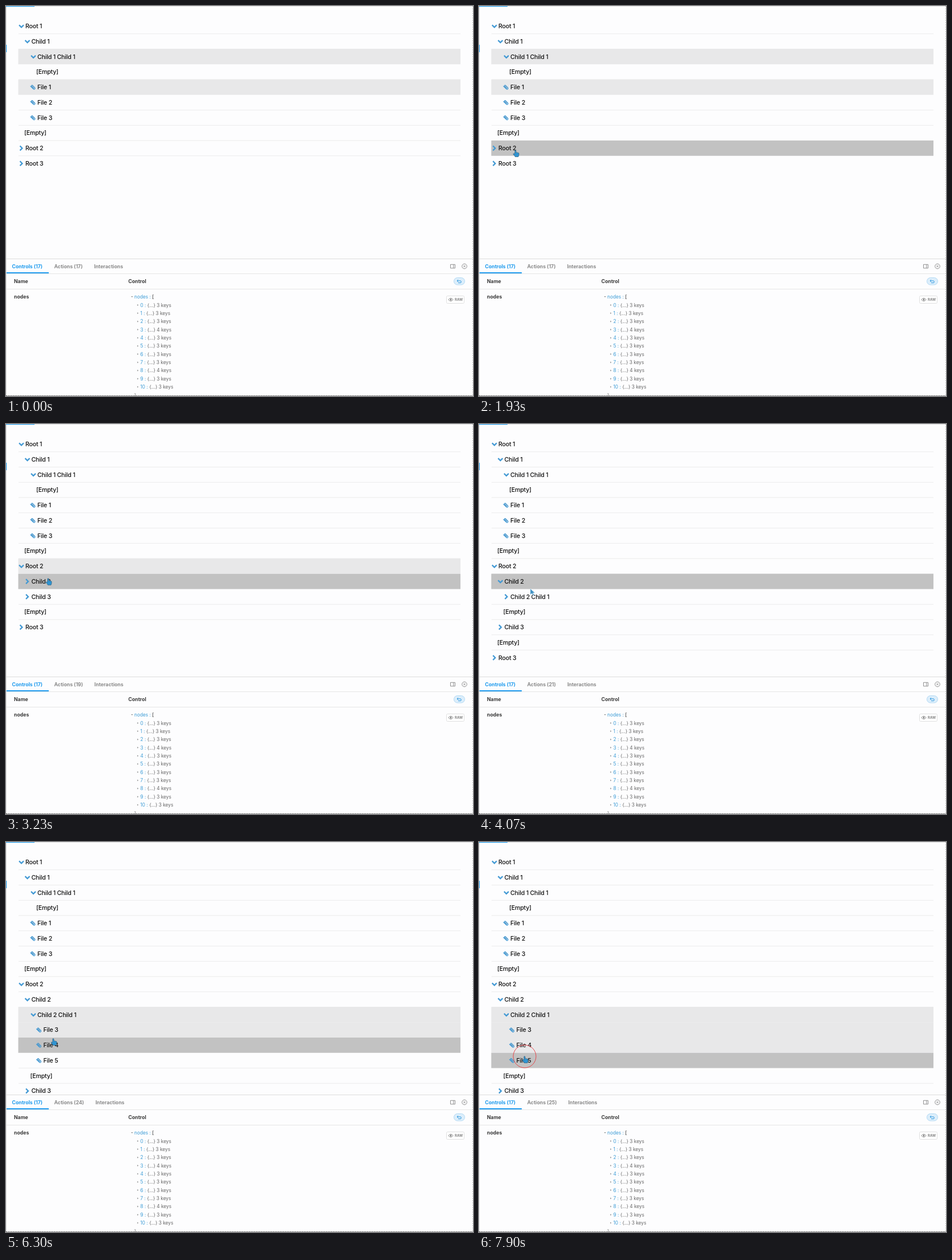
Recreate the animation shown at these times as an HTML page. Size 819 px wide and 684 px high, loop 8 s.

```html
<!DOCTYPE html>
<html lang="en">
<head>
<meta charset="utf-8">
<title>Tree view</title>
<style>
  html, body { margin: 0; width: 100%; height: 100%; overflow: hidden; background: #fdfdfe; }
  svg { display: block; width: 819px; height: 684px; font-family: Inter, Roboto, sans-serif; }
  #tree { font-size: 10.6px; letter-spacing: -.2px; fill: #111; stroke: none; font-weight: 450; }
  .ui { font-size: 8.7px; font-weight: 700; fill: #3a3a3a; }
  .muted { fill: #8b8b8b; }
  .blue { fill: #1e9bee; }
  .json { font-size: 8.3px; fill: #666; white-space: pre; }
  .json .key { fill: #3a9bd6; }
  .line { fill: none; stroke: #e6e6e6; }
  .icon { fill: none; stroke: #858585; stroke-width: .9; }
</style>
</head>
<body>
<svg viewBox="0 0 819 684">
  <defs>
    <path id="open" d="M-4 -2 L0 2 L4 -2" fill="none" stroke="#4299d4" stroke-width="2.2"/>
    <path id="closed" d="M-2 -4 L2 0 L-2 4" fill="none" stroke="#4299d4" stroke-width="2.2"/>
    <g id="file" fill="none" stroke-linecap="round" transform="rotate(45)">
      <path d="M-4 1.6 H3 A1.7 1.7 0 0 0 3 -1.8 H-2.8 A1.1 1.1 0 0 0 -2.8 .3 H2.5" stroke="#4299d4" stroke-width="1.3"/>
      <path d="M-2.5 -.7 H2.6" stroke="#7d98aa" stroke-width=".7"/>
    </g>
  </defs>
  <rect width="819" height="684" fill="#fdfdfe"/>
  <g id="tree"></g>

  <rect y="443" width="819" height="241" fill="#fdfdfe"/>
  <path class="line" d="M0 469.5 H819 M0 496.5 H819"/>
  <path d="M0 443.5 H819" stroke="#dcdcdc"/>
  <rect y="467" width="75" height="2" fill="#1e9bee"/>
  <text class="ui blue" x="10.5" y="460">Controls (17)</text>
  <text class="ui muted" x="84.5" y="460">Actions (<tspan id="count">17</tspan>)<tspan dx="20">Interactions</tspan></text>
  <g class="icon">
    <path d="M779.5 453.3 H787.5 V459.8 H779.5 Z M784.8 453.3 V459.8"/>
    <circle cx="804" cy="456.5" r="4.3"/>
    <path d="M802.3 454.8 L805.7 458.2 M805.7 454.8 L802.3 458.2"/>
  </g>
  <text class="ui" x="14" y="486">Name</text>
  <text class="ui" x="214.5" y="486">Control</text>
  <rect x="785.5" y="476.5" width="19" height="12.5" rx="6.2" fill="#dceefb" stroke="#b4daf4"/>
  <path d="M793 480 L791 482 L793 484 M791 482 H797 A1.8 1.8 0 0 1 797 485.5 H793" fill="none" stroke="#2f98df"/>
  <text class="ui" x="14" y="513" fill="#222">nodes</text>
  <rect x="772.5" y="508.5" width="31" height="13" rx="2" fill="#fff" stroke="#e0e0e0"/>
  <path class="icon" d="M775.8 515 Q780 509.8 784.2 515 Q780 520.2 775.8 515 Z"/>
  <circle cx="780" cy="515" r="1.4" fill="#777"/>
  <text x="787" y="517.3" font-size="6" font-weight="700" fill="#858585">RAW</text>
  <g id="json"></g>

  <path d="M.5 0 V684" stroke="#e2e2e2"/>
  <path d="M0 .5 H819" stroke="#e2e2e2"/>
  <path d="M818.5 0 V684" stroke="#ccc" stroke-dasharray="2 2"/>
  <path d="M0 683.5 H819" stroke="#555" stroke-dasharray="2 1"/>
  <rect width="50" height="1.2" fill="#2c9fec"/>
  <rect y="68" width="1.2" height="13" fill="#2c9fec"/>

  <g id="pointer">
    <circle id="ring" r="20" fill="none" stroke="#e5484d" stroke-width="1"/>
    <path id="hand" d="M-1 0 Q.6 -.8 1 1 V4 Q2 3.2 2.8 4.2 Q3.8 3.5 4.5 4.6 Q6 4.2 6 6 V8 Q5.8 10 4.8 11.5 H-.5 Q-1.5 9.5 -4 7 Q-4 5.3 -2.4 6 L-1.4 7 Z"
      fill="#2f94d2" stroke="#38627c" stroke-width=".7"/>
    <path id="arrow" d="M-1 0 L7 7.3 H3.6 L5.5 11 L3.7 11.8 L2 8 L-1 10.2 Z" fill="#3f92c4" stroke="#e4eef4" stroke-width=".5"/>
  </g>
</svg>
<script>
const $ = id => document.getElementById(id);
const LOOP = 8000, TOP = 22, PITCH = 26.75, INDENT = 10.5;

// depth, label, stage at which it appears, stage at which it opens (folders only)
const NODES = [
  [0, 'Root 1', 0, 0], [1, 'Child 1', 0, 0], [2, 'Child 1 Child 1', 0, 0], [3, '[Empty]', 0],
  [2, 'File 1', 0], [2, 'File 2', 0], [2, 'File 3', 0], [1, '[Empty]', 0],
  [0, 'Root 2', 0, 1], [1, 'Child 2', 1, 2], [2, 'Child 2 Child 1', 2, 3],
  [3, 'File 3', 3], [3, 'File 4', 3], [3, 'File 5', 3],
  [2, '[Empty]', 2], [1, 'Child 3', 1, 9], [1, '[Empty]', 1], [0, 'Root 3', 0, 9]
];

// Selected rows are indices into NODES
const STEPS = [
  { at: 0, stage: 0, selected: [2, 4], count: 17 },
  { at: 2400, stage: 1, selected: [8], count: 19 },
  { at: 3600, stage: 2, selected: [9], count: 21 },
  { at: 4800, stage: 3, selected: [10], count: 23 },
  { at: 5860, stage: 3, selected: [10, 11], count: 24 },
  { at: 6950, stage: 3, selected: [10, 11, 12], count: 25 }
];
const PRESS = 200;
const PRESSES = [...STEPS.slice(1).map(s => s.at - PRESS), 7800];

// time, x, y of the pointer's tip
const PATH = [
  [1300, -14, 300], [1800, 62, 254], [1930, 64, 253], [2200, 66, 252], [2700, 66, 252],
  [3230, 74, 271], [3700, 76, 272], [4070, 91, 289], [4400, 89, 309], [4900, 87, 308],
  [5330, 87, 312], [5630, 85, 325], [5880, 85, 325], [6300, 83, 345], [6600, 82, 351],
  [7050, 82, 351], [7500, 81, 374], [7900, 80, 376], [8000, 80, 376]
];

function pointerAt(t) {
  const i = PATH.findIndex(p => p[0] > t);
  if (i < 1) return null;
  const [a, b] = [PATH[i - 1], PATH[i]];
  const u = (t - a[0]) / (b[0] - a[0]);
  const k = u * u * (3 - 2 * u);
  return { x: a[1] + (b[1] - a[1]) * k, y: a[2] + (b[2] - a[2]) * k };
}

function rowMarkup([depth, label, , opens], row, stage, fill, last) {
  const top = TOP + row * PITCH, mid = top + PITCH / 2, dx = depth * INDENT;
  const empty = label === '[Empty]';
  const icon = opens === undefined ? 'file' : stage >= opens ? 'open' : 'closed';
  const iconX = { file: 26, open: 27, closed: 26.5 }[icon] + dx;
  return (fill ? `<rect x="21.5" y="${top}" width="775.5" height="${PITCH}" fill="${fill}"/>` : '') +
    (last || fill ? '' : `<rect x="22" y="${top + PITCH - .5}" width="775" height="1" fill="#ececec"/>`) +
    (empty ? '' : `<g transform="translate(${iconX} ${mid})"><use href="#${icon}"/></g>`) +
    `<text x="${(empty ? 21.5 : 34) + dx}" y="${mid + 3.8}">${label}</text>`;
}

let shown = '';
function draw(t) {
  const step = STEPS.findLast(s => s.at <= t);
  const pos = pointerAt(t);
  const rows = NODES.map((n, i) => i).filter(i => NODES[i][2] <= step.stage);
  const over = pos && pos.x > 21 ? Math.floor((pos.y - TOP) / PITCH) : -1;
  const key = step.at + ':' + over;
  if (key !== shown) {
    shown = key;
    $('tree').innerHTML = rows.map((n, row) => {
      const fill = row === over ? '#c2c2c2' : step.selected.includes(n) ? '#e8e8e9' : '';
      return rowMarkup(NODES[n], row, step.stage, fill, row === rows.length - 1);
    }).join('');
    $('count').textContent = step.count;
  }
  $('pointer').style.display = pos ? '' : 'none';
  if (!pos) return;
  $('pointer').setAttribute('transform', `translate(${pos.x} ${pos.y})`);
  const arrow = pos.x < 21 || (t > 3960 && t < 4180);
  $('arrow').style.display = arrow ? '' : 'none';
  $('hand').style.display = arrow ? 'none' : '';
  $('ring').style.display = PRESSES.some(p => t >= p && t < p + PRESS) ? '' : 'none';
}

$('json').innerHTML =
  '<path d="M219.5 509 h3 l-1.5 2 z" fill="#888"/>' +
  '<text class="json" x="225" y="513.3" font-size="8.7"><tspan class="key">nodes : </tspan><tspan fill="#222">[</tspan></text>' +
  Array.from({ length: 11 }, (_, i) => {
    const y = 524.5 + i * 14.35;
    return `<path d="M230.3 ${y - 1.5} l2 1.5 l-2 1.5 z" fill="#888"/>` +
      `<text class="json" x="235.5" y="${y + 3}"><tspan class="key">${i} : </tspan>{...} ${i === 3 || i === 8 ? 4 : 3} keys</text>`;
  }).join('') + '<text class="json" x="225" y="686">]</text>';

const start = performance.now();
function tick() {
  draw((performance.now() - start) % LOOP);
  requestAnimationFrame(tick);
}
tick();
</script>
</body>
</html>
```
